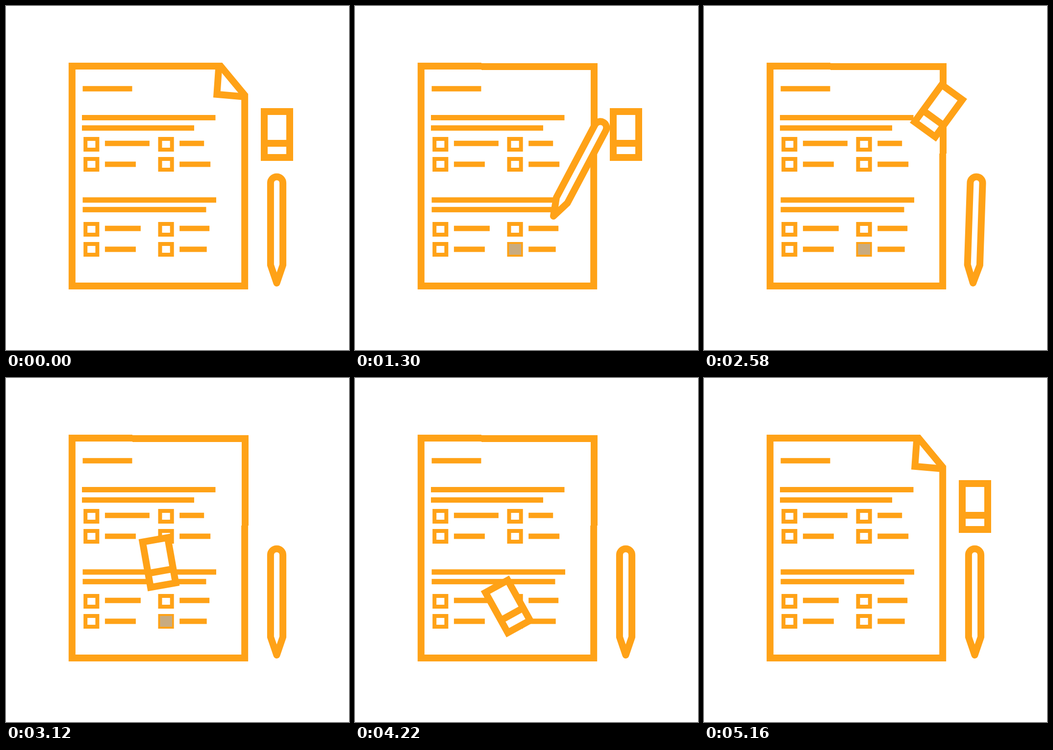
Write an HTML page with a canvas that moves like this. It is 700x704 px and loops after 6 s.

```html
<!DOCTYPE html>
<html lang="en">
<head>
<meta charset="utf-8">
<title>Questionnaire</title>
<style>
  html, body { margin: 0; width: 100%; height: 100%; overflow: hidden; background: #fff; }
  canvas { display: block; width: 700px; height: 704px; }
</style>
</head>
<body>
<canvas id="stage" width="700" height="704"></canvas>
<script>
const ctx = document.getElementById('stage').getContext('2d');
const ORANGE = '#ffa217', GREY = '#c8ab80';
const LOOP = 6000, STEP = 20, LINE = 14;

const ramp = (t, from, to) => Math.min(1, Math.max(0, (t - from) / (to - from)));
const ease = u => u * u * (3 - 2 * u);
const easeOut = (u, power) => 1 - (1 - u) ** power;
const mix = (a, b, u) => a + (b - a) * u;

// Move between two poses, bulging upwards on the way
function glide(a, b, u, bulge = 0, move = ease(u), turn = move) {
  return {
    x: mix(a.x, b.x, move),
    y: mix(a.y, b.y, move) - bulge * Math.sin(Math.PI * u),
    angle: mix(a.angle, b.angle, turn)
  };
}

const pose = (x, y, angle) => ({ x, y, angle });

const pencilHome = pose(552.5, 465, 0);
const pencilRaised = pose(594, 376, 28);
const pencilWriting = pose(330, 388, 27.5);
const pencilSwung = pose(504, 320, 28);

function pencilPose(t) {
  if (t < 680) return glide(pencilHome, pencilRaised, ramp(t, 0, 680));
  if (t < 1040) return glide(pencilRaised, pencilWriting, ramp(t, 680, 1040), 50);
  if (t < 1980) {
    const sweep = (1 - Math.cos(2 * Math.PI * ramp(t, 1040, 1860))) / 2;
    return glide(pencilWriting, pencilSwung, sweep, 0, sweep);
  }
  const u = ramp(t, 1980, 2580);
  return glide(pencilWriting, pencilHome, u, 10, ease(u), ramp(t, 2250, 2605));
}

const eraserHome = pose(553, 263, 0);
const eraserTilted = pose(478.5, 214.5, 36);
const eraserLanding = pose(312.5, 377.5, -10);
const eraserReturned = pose(551, 260, -26);

function rubPose(t) {
  const rub = Math.cos(2 * Math.PI * (t - 3340) / 480);
  return pose(315.5 - 7.5 * rub, 466.5 + 2 * rub, -29);
}

function eraserPose(t) {
  if (t < 2580) {
    const u = ramp(t, 1860, 2580);
    return glide(eraserHome, eraserTilted, u, -17, easeOut(u, 2.2), easeOut(u, 1.8));
  }
  if (t < 3120) {
    const u = ramp(t, 2580, 3120);
    return glide(eraserTilted, eraserLanding, u, 0, u ** 1.6);
  }
  if (t < 3340) {
    const u = ramp(t, 3120, 3340);
    return glide(eraserLanding, rubPose(3340), u, 0, easeOut(u, 1.3));
  }
  if (t < 4300) return rubPose(t);
  if (t < 5040) {
    const u = ramp(t, 4300, 5040);
    return glide(rubPose(4300), eraserReturned, u, 0, u ** 1.2);
  }
  return glide(eraserReturned, eraserHome, ramp(t, 5040, 5160));
}

function bar(x, y, width) {
  ctx.fillStyle = ORANGE;
  ctx.fillRect(x, y, width, 11);
}

function line(...points) {
  ctx.beginPath();
  points.forEach(p => ctx.lineTo(...p));
  ctx.stroke();
}

function drawPage(open) {
  const left = 134.8, right = 487.2, top = 123, bottom = 573;
  const seamX = 258, seamY = 302;
  const fold = (x, y) => [mix(x, right, open), mix(y, top, open)];
  ctx.lineWidth = LINE;
  ctx.lineJoin = 'miter';
  line([seamX, top], [left, top], [left, bottom], [right, bottom], [right, seamY]);
  if (open < 1) {
    line([seamX, top], fold(438, top), fold(right, 182.5), [right, seamY]);
    line(fold(434.3, 125), fold(430.4, 180.8), fold(487, 185.8));
  } else {
    line([seamX, top + 1], [right + 0.8, top + 1], [right + 0.8, seamY]);
  }
}

function drawQuestions(tint) {
  bar(156.5, 163.8, 101);
  bar(155, 223, 272.5);
  bar(155, 244.2, 229);
  bar(156.5, 391.5, 272.5);
  bar(156.5, 411.2, 252);
  const answers = [91, 50, 63, 63, 73, 61, 63, 55.5];
  ctx.lineWidth = 8;
  answers.forEach((width, i) => {
    const column = i % 2, row = (i >> 1) % 2, group = i >> 2;
    const x = 162.2 + 152.3 * column, y = 268 + 174 * group;
    ctx.strokeRect(x, y + 4 + 41 * row, 24.2, 22);
    bar(x + 39.7, y + 7.7 + 42.7 * row, width);
  });
  ctx.globalAlpha = tint;
  ctx.fillStyle = GREY;
  ctx.fillRect(314.5, 487, 24.5, 22);
  ctx.globalAlpha = 1;
}

function placed({ x, y, angle }, draw) {
  ctx.save();
  ctx.translate(x, y);
  ctx.rotate(angle * Math.PI / 180);
  ctx.fillStyle = '#fff';
  ctx.lineWidth = LINE;
  draw();
  ctx.restore();
}

function eraser() {
  ctx.beginPath();
  ctx.rect(-26, -47, 52, 94);
  ctx.fill();
  ctx.moveTo(-26, 18);
  ctx.lineTo(26, 18);
  ctx.stroke();
}

function pencil() {
  const radius = 12.6;
  ctx.lineJoin = 'round';
  ctx.beginPath();
  ctx.arc(0, -103, radius, Math.PI, 0);
  ctx.lineTo(radius, 65);
  ctx.lineTo(0, 102);
  ctx.lineTo(-radius, 65);
  ctx.closePath();
  ctx.fill();
  ctx.stroke();
}

function render(t) {
  ctx.fillStyle = '#fff';
  ctx.fillRect(0, 0, 700, 704);
  ctx.strokeStyle = ORANGE;
  drawPage(ease(ramp(t, 0, 600)) - ease(ramp(t, 4860, 5160)));
  drawQuestions(ramp(t, 1000, 1200) - ramp(t, 3400, 4200));
  placed(eraserPose(t), eraser);
  placed(pencilPose(t), pencil);
}

const start = performance.now();
function tick() {
  const t = (performance.now() - start) % LOOP;
  render(Math.floor(t / STEP) * STEP);
  requestAnimationFrame(tick);
}
tick();
</script>
</body>
</html>
```
